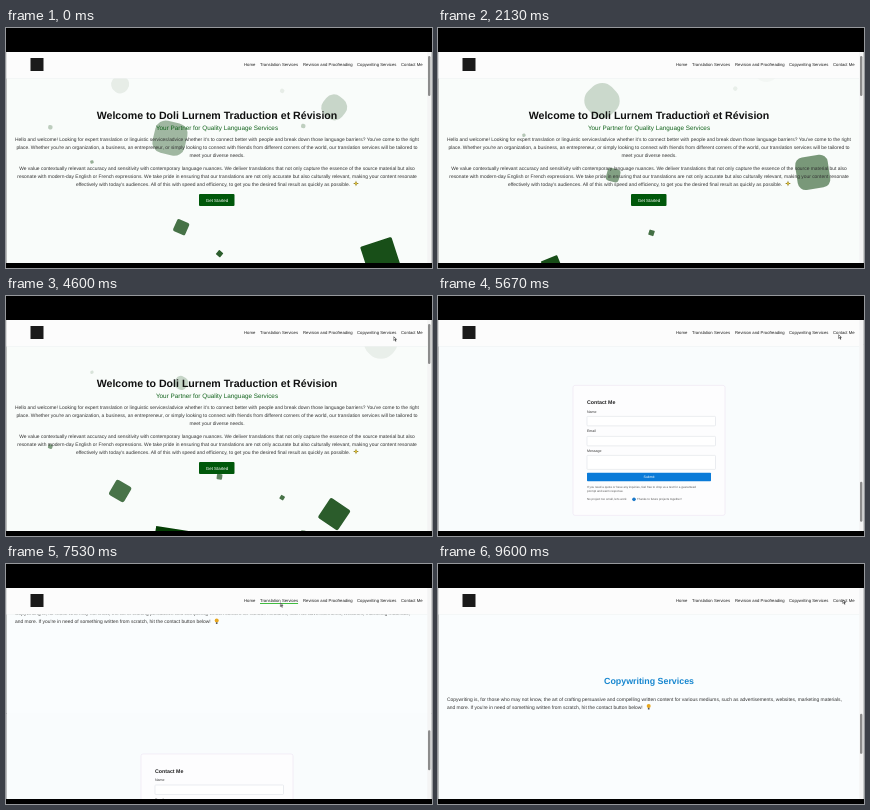
Animation of 426x240 px, one loop 9670 ms. Source, as an HTML page with a canvas:

```html
<!DOCTYPE html>
<html lang="en">
<head>
<meta charset="utf-8">
<title>Translation site tour</title>
<style>
html, body { margin: 0; width: 100%; height: 100%; overflow: hidden; background: #000; }
canvas { display: block; width: 426px; height: 240px; }
</style>
</head>
<body>
<canvas id="stage"></canvas>
<script>
const canvas = document.getElementById("stage");
const ctx = canvas.getContext("2d");
const dpr = window.devicePixelRatio || 1;
canvas.width = Math.round(426 * dpr);
canvas.height = Math.round(240 * dpr);

const LOOP = 9670, FPS = 15;
const PX = 0.2195;               // stage pixels per page pixel
const TOP = 24, VIEW = 211, BOTTOM = TOP + VIEW, WIDTH = 421.5;
const MID = 211;
const BODY = 4.93;
const SANS = '"Liberation Sans", Arial, sans-serif';

// Floating boxes: left share, size in page px, delay s, duration s
const BOXES = [
  [.25, 80, 0, 25], [.10, 20, 2, 12], [.70, 20, 4, 25], [.40, 60, 0, 18], [.65, 20, 0, 25],
  [.75, 110, 3, 25], [.35, 150, 7, 25], [.50, 25, 15, 45], [.20, 15, 2, 35], [.85, 150, 0, 11]
];
const PAGE_START = 23.1, PAGE_SPEED = 2;

const NAV = [
  ["Home", 238, "#178a17"], ["Translation Services", 254, "#2bb52b"],
  ["Revision and Proofreading", 297, "#7a35b8"], ["Copywriting Services", 351, "#1689d4"],
  ["Contact Me", 395, "#1689d4"]
];
// Hovered item, from s, to s
const HOVERS = [[1, 2.8, 3.62], [2, 3.66, 4.05], [3, 4.1, 4.45], [4, 4.85, 5.3],
  [1, 7.25, 7.85], [2, 8.25, 8.75], [3, 8.85, 9.3]];
// From s, to s, scroll from, scroll to
const SCROLLS = [[5.1, 5.7, 0, 826.5], [7.4, 7.9, 826.5, 211], [8.1, 8.53, 211, 422], [8.95, 9.38, 422, 633]];
const CURSOR = [[0, 268, 86], [2.13, 269, 83], [2.8, 268, 40], [3.3, 275, 39], [3.6, 296, 38],
  [4.6, 388, 41], [4.95, 404, 38], [5.6, 404, 38], [6.6, 155, 114], [6.85, 155, 114],
  [7.3, 273, 39], [7.8, 276, 39], [8.1, 322, 39], [8.33, 334, 40], [8.6, 334, 40],
  [8.9, 370, 38], [9.2, 372, 38], [9.6, 405, 36], [9.7, 405, 36]];

const clamp = v => Math.max(0, Math.min(1, v));
const ease = v => v * v * (3 - 2 * v);

function text(str, x, y, size, color, align = "left", weight = "normal") {
  ctx.font = `${weight} ${size}px ${SANS}`;
  ctx.fillStyle = color;
  ctx.textAlign = align;
  ctx.fillText(str, x, y + size * 0.35);
}

function rect(x, y, w, h, color) {
  ctx.fillStyle = color;
  ctx.fillRect(x, y, w, h);
}

function panel(x, y, w, h, r, fill, stroke) {
  ctx.beginPath();
  ctx.roundRect(x, y, w, h, r);
  if (fill) { ctx.fillStyle = fill; ctx.fill(); }
  if (stroke) { ctx.strokeStyle = stroke; ctx.lineWidth = 0.5; ctx.stroke(); }
}

function disc(x, y, r, color) {
  ctx.fillStyle = color;
  ctx.beginPath();
  ctx.arc(x, y, r, 0, Math.PI * 2);
  ctx.fill();
}

function polygon(points, fill) {
  ctx.beginPath();
  points.forEach(([x, y]) => ctx.lineTo(x, y));
  ctx.closePath();
  ctx.fillStyle = fill;
  ctx.fill();
}

function lines(list, x, y, color, align) {
  list.forEach((line, i) => text(line, x, y + i * 7.9, BODY, color, align));
}

function boxes(time, color) {
  const page = PAGE_START + time * PAGE_SPEED;
  for (const [left, px, delay, duration] of BOXES) {
    const p = (page - delay) / duration % 1;
    const size = px * PX;
    ctx.save();
    ctx.translate(left * WIDTH + size / 2, BOTTOM + 150 * PX - size / 2 - p * 1000 * PX);
    ctx.rotate(p * Math.PI * 4);
    ctx.globalAlpha = 1 - p;
    panel(-size / 2, -size / 2, size, size, p * size / 2, color);
    ctx.restore();
  }
}

function sparkle(x, y) {
  const pts = [];
  for (let i = 0; i < 8; i++) {
    const r = i % 2 ? 1 : 3, a = i * Math.PI / 4;
    pts.push([x + r * Math.cos(a), y + r * Math.sin(a)]);
  }
  polygon(pts, "#8a7a20");
  disc(x, y, 1, "#e8c53a");
}

function hero(time) {
  boxes(time, "#003c00");
  text("Welcome to Doli Lurnem Traduction et Révision", MID, 87.5, 10.6, "#111", "center", "bold");
  text("Your Partner for Quality Language Services", MID, 99.5, 6.35, "#12631c", "center");
  lines([
    "Hello and welcome! Looking for expert translation or linguistic services/advice whether it's to connect better with people and break down those language barriers? You've come to the right",
    "place. Whether you're an organization, a business, an entrepreneur, or simply looking to connect with friends from different corners of the world, our translation services will be tailored to",
    "meet your diverse needs."
  ], MID, 111.5, "#333", "center");
  lines([
    "We value contextually relevant accuracy and sensitivity with contemporary language nuances. We deliver translations that not only capture the essence of the source material but also",
    "resonate with modern-day English or French expressions. We take pride in ensuring that our translations are not only accurate but also culturally relevant, making your content resonate"
  ], MID, 140, "#333", "center");
  text("effectively with today's audiences. All of this with speed and efficiency, to get you the desired final result as quickly as possible.",
    207, 155.8, BODY, "#333", "center");
  sparkle(350, 155.5);
  panel(193, 166, 35.5, 12, 1, "#00580a");
  text("Get Started", MID, 172.2, 4.39, "#fff", "center");
}

function translation() {
  text("Translation Services", MID, 101, 8.8, "#12631c", "center", "bold");
  lines([
    "We translate documents, websites and everyday correspondence between English and French, with care for tone, context and the people who will be reading your words.",
    "Every text is checked for accuracy and for the way it sounds to a native reader."
  ], 9, 118, "#333");
  lines([
    "From short messages to long reports, we adapt the wording to your audience and your field, so that nothing is lost along the way.",
    "Tell us what you need, and we will find the right words for it."
  ], 9, 142, "#333");
  text("Have a project in mind? We would be happy to help you bring it to a wider public.", 9, 165.5, BODY, "#333");
}

function revision(time) {
  boxes(time, "#0c1018");
  text("Revision and Proofreading", MID, 116.5, 8.85, "#1f2a3d", "center", "bold");
  lines([
    "While AI tools have made significant strides in language processing, the nuanced understanding and contextual finesse provided by human proofreading still surpass the capabilities of",
    "automated solutions. All you need is a revisor's eagle eye to make sure your text is polished to perfection, prior to its publication. We are proficient at grammatical errors, typos, or",
    "awkward turns of phrase, so that every page reads clearly and naturally."
  ], 9, 129.5, "#444");
}

function copywriting() {
  text("Copywriting Services", MID, 117.3, 8.85, "#1686cf", "center", "bold");
  lines([
    "Copywriting is, for those who may not know, the art of crafting persuasive and compelling written content for various mediums, such as advertisements, websites, marketing materials,",
    "and more. If you're in need of something written from scratch, hit the contact button below!"
  ], 9, 135, "#333");
  disc(210.7, 142, 2, "#e8a820");
  rect(209.9, 143.8, 1.6, 1.7, "#555");
}

function contact() {
  panel(135, 82, 152, 130, 2, "#fdfdfe", "#e9dfee");
  text("Contact Me", 149, 99, 5.27, "#222", "left", "bold");
  [["Name", 108, 113, 9.5], ["Email", 127.8, 133, 9.5], ["Message", 147.3, 152, 14]].forEach(([label, y, top, h]) => {
    text(label, 149, y, 3.55, "#333");
    panel(149, top, 128.5, h, 0.8, "#fff", "#d6dbe0");
  });
  panel(149, 169.3, 124, 8.7, 0.8, "#0b7bd8");
  text("Submit", MID, 173.8, 3.5, "#fff", "center");
  text("If you need a quote or have any inquiries, feel free to drop us a text for a guaranteed", 149, 184, 2.93, "#555");
  text("prompt and warm response.", 149, 187.8, 2.93, "#555");
  text("No project too small, let's work", 149, 196, 2.93, "#555");
  disc(196, 196, 1.8, "#1a78c8");
  text("Thanks to future projects together!", 199, 196, 2.93, "#555");
}

const SECTIONS = [
  [0, VIEW, "#f9fcfa", hero], [211, VIEW, "#fbfcfc", translation], [422, VIEW, "#f9fcfd", revision],
  [633, VIEW, "#fafdfe", copywriting], [826.5, VIEW, "#f9fcfd", contact]
];

function scrollAt(time) {
  let y = 0;
  for (const [from, to, a, b] of SCROLLS)
    if (time >= from) y = a + (b - a) * ease(clamp((time - from) / (to - from)));
  return y;
}

function page(time, scroll) {
  ctx.save();
  ctx.beginPath();
  ctx.rect(0.5, TOP, 425, VIEW);
  ctx.clip();
  rect(0, TOP, 426, VIEW, "#f9fcfd");
  SECTIONS.forEach(([top, height, color, draw], i) => {
    const dy = top - scroll;
    if (Math.abs(dy) >= height) return;
    // The last section is shorter and starts where the one before it ends
    const inset = i === 4 ? 17.5 : 0;
    ctx.save();
    ctx.translate(0, dy);
    ctx.beginPath();
    ctx.rect(0, TOP + inset, 426, height - inset);
    ctx.clip();
    rect(0, TOP, 426, height, color);
    draw(time);
    ctx.restore();
  });
  ctx.restore();
}

function header(time) {
  rect(0.5, TOP, 421, 26, "#fcfcfc");
  rect(0.5, 50, 421, 0.6, "#f1f3f3");
  rect(24.5, 30, 13, 13, "#1a1a1a");
  for (const [label, x] of NAV) text(label, x, 36.4, 4.23, "#1c1c1c");
  for (const [item, from, to] of HOVERS) {
    const grow = Math.min(clamp((time - from) / 0.14), clamp((to + 0.1 - time) / 0.1));
    if (!grow) continue;
    const [label, x, color] = NAV[item];
    ctx.font = `4.23px ${SANS}`;
    const w = ctx.measureText(label).width;
    rect(x + w * (1 - grow) / 2, 39, w * grow, 0.9, color);
  }
}

function scrollbar(scroll) {
  rect(421.3, TOP, 4, VIEW, "#f4f4f4");
  panel(422, 28 + scroll * 0.1925, 2.4, 40, 1.2, "#8c8c8c");
}

function cursor(time) {
  const i = CURSOR.findIndex(([at], n) => n && at > time);
  const [t0, x0, y0] = CURSOR[i - 1], [t1, x1, y1] = CURSOR[i];
  const k = ease((time - t0) / (t1 - t0));
  ctx.save();
  ctx.translate(x0 + (x1 - x0) * k, y0 + (y1 - y0) * k);
  polygon([[-.4, -.8], [-.4, 4], [.8, 3.1], [1.6, 4.7], [2.4, 4.3], [1.8, 2.8], [3.1, 2.6]], "#444");
  polygon([[.1, .4], [.1, 2.8], [.9, 2.2], [1.8, 2.1]], "#fff");
  ctx.restore();
}

function frame() {
  const ms = performance.now() % LOOP;
  const time = Math.floor((ms + 4) * FPS / 1000) / FPS;
  const scroll = scrollAt(time);
  ctx.setTransform(dpr, 0, 0, dpr, 0, 0);
  ctx.textRendering = "geometricPrecision";
  rect(0, 0, 426, 240, "#000");
  page(time, scroll);
  header(time);
  scrollbar(scroll);
  cursor(time);
  requestAnimationFrame(frame);
}
frame();
</script>
</body>
</html>
```
